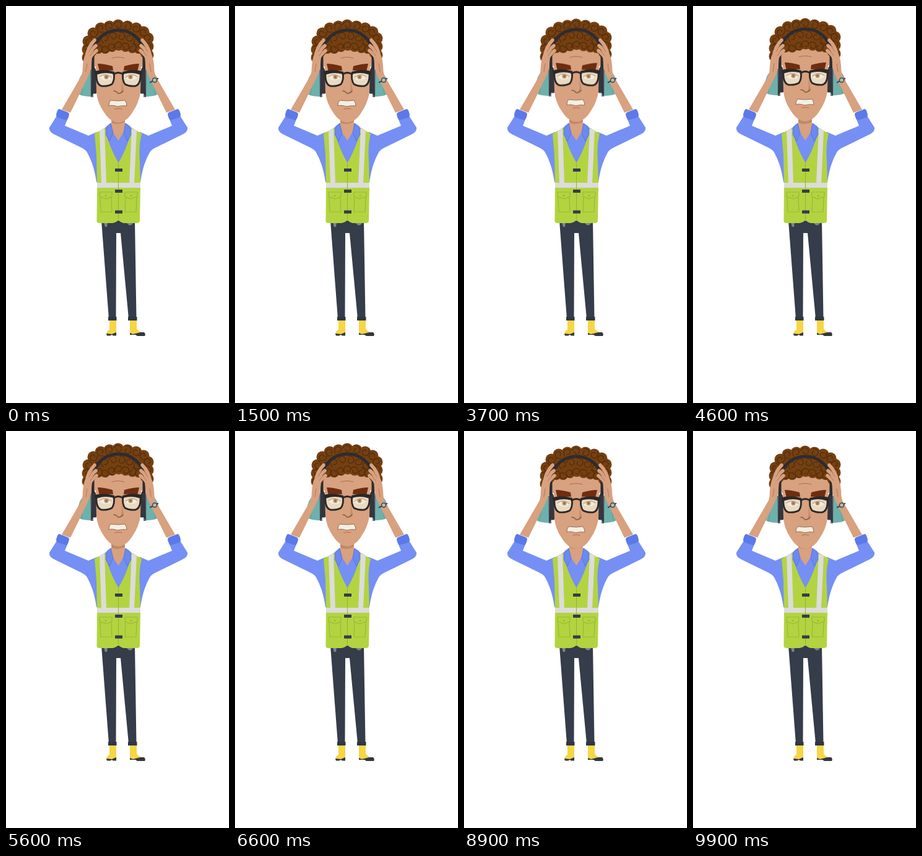
These frames come from a looping animation (360x640 px, 10 s). An HTML page:

```html
<!DOCTYPE html>
<html lang="en">
<head>
<meta charset="utf-8">
<title>Stressed worker</title>
<style>
  html, body { margin: 0; width: 100%; height: 100%; overflow: hidden; background: #fff; }
  svg { display: block; width: 100vw; height: 100vh; }
  .skin { fill: #d8a17f; }
  .shirt { fill: #758ff4; }
  .cuff { fill: #5c79e8; }
  .vest { fill: #b3d440; }
  .tape { fill: #dcdcda; }
  .dark { fill: #353c4a; }
  .line { fill: none; stroke-linecap: round; stroke-linejoin: round; }
  .head { animation: shake 500ms step-end infinite; }
  /* a sine sampled five times per cycle */
  @keyframes shake {
    0%, 100% { transform: translateY(0); }
    20% { transform: translateY(-2px); }
    40% { transform: translateY(-1.2px); }
    60% { transform: translateY(1.2px); }
    80% { transform: translateY(2px); }
  }
</style>
</head>
<body>
<svg viewBox="0 0 360 640">
  <defs>
    <g id="sleeve">
      <path class="shirt" d="M82 177L99 183L95 193L133 209L147 203L157 215V284H146Q142 255 131 236Q128 231 121 228L78 207Q69 203 70 196Z"/>
      <path class="cuff" d="M86 166Q83 166 81 175Q81 179 84 180L97 184Q100 184 102 175Q102 172 99 171Z"/>
    </g>
    <g id="hand">
      <path class="skin" d="M90 167L122 112Q124 105 124 96Q125 80 132 70L139 82Q138 91 138 98Q136 108 131 117L104 172Z"/>
      <path class="line" stroke="#d8a17f" stroke-width="5.500" d="M130 82Q132 66 143 55M132 84Q136 71 145 64M134 87Q138 78 146 72"/>
      <path class="line" stroke="#a96f50" stroke-width=".8" d="M140 64L134 74M142 72L136 80M131 93Q130 100 129 106"/>
    </g>
    <g id="muff">
      <path fill="#6db1ac" d="M138 102Q126 102 119 116Q114 130 115 139Q117 146 139 146Z"/>
      <path class="line" stroke="#5b9d9b" stroke-width="1" d="M132 107Q124 119 122 143"/>
      <path fill="#6c7278" d="M136 103L141 99V147H137Z"/>
      <path fill="#34363e" d="M138 97Q143 96 145 103L147 138Q146 143 141 141L137 147Z"/>
    </g>
    <g id="lens">
      <path id="rim" fill="#e9dac4" d="M146 108Q160 104 174 108Q176 119 171 126Q164 130 154 129Q145 126 146 108Z"/>
      <path fill="#f4ebdc" d="M151 116Q160 107 170 117Q161 123 151 116Z"/>
      <circle cx="162" cy="114.500" r="3.500" fill="#b99568"/>
      <circle cx="162" cy="114.500" r="1.300" fill="#7d6246"/>
      <path class="line" stroke="#b48f70" stroke-width="1" d="M151 114Q160 107 170 115"/>
      <use class="line" href="#rim" fill-opacity="0" stroke="#2b2827" stroke-width="2.800"/>
      <path fill="#2b2827" d="M143 105Q160 101 175 106V110Q160 106 149 110L144 111Z"/>
    </g>
    <g id="pocket" class="line" stroke="#98b936" stroke-width="1.2">
      <path d="M152 308L153 332H171L170 308M151 300H171V307L162 311L151 307Z"/>
      <circle cx="161" cy="306" r=".8"/>
    </g>
    <path id="curl" class="line" stroke="#552d0c" stroke-width="1.4" d="M-6 4Q-8 -5 0 -6Q7 -4 4 2Q1 5 -2 2"/>
  </defs>

  <!-- legs -->
  <path class="dark" d="M154 346H208L210.500 503L198 504L185 366H178L177.500 504H166Z"/>
  <path fill="#2f3644" d="M165 501H178.500V507H165ZM197 501H211.500V507H197Z"/>
  <path fill="#7d858c" d="M158 349H164L163 356H160ZM194 349H205Q203 355 198 353Z"/>
  <path fill="#f6d644" d="M167 507H178V527L171 530H162Q162 524 167 522ZM200 507H211V520Q213 524 217 525V529H200Z"/>
  <path fill="#34373d" d="M162 528L171 529L178 526V531.500H173L171 530L168 531.500H163ZM200 527L205 529L217 526H223Q226 529 224 532H212L209 530H200Z"/>

  <!-- arms and torso -->
  <use href="#sleeve"/>
  <use href="#sleeve" transform="translate(363 0) scale(-1 1)"/>
  <path class="shirt" d="M158 198L169 189H193L205 198V255H158Z"/>
  <path class="vest" d="M143 206L160 196Q164 222 181.500 253Q199 222 203 196L219 206Q214 225 216 250L217 290L216 347Q215 350 211 350H190Q185 349 181.500 345Q178 349 172 350H151Q147 350 146.500 347L147 290L146 240Z"/>
  <path class="tape" d="M151 201L159 197L162 286H154ZM203 197L211 201L207 286H199ZM147 285H217V293H147Z"/>
  <path class="line" stroke="#93b236" stroke-width="1" d="M181.500 254V345"/>
  <g class="dark">
    <rect x="176" y="262" width="12" height="5"/>
    <rect x="176" y="296" width="12" height="5"/>
    <rect x="176" y="329.500" width="12" height="5"/>
  </g>
  <use href="#pocket"/>
  <use href="#pocket" transform="translate(363 0) scale(-1 1)"/>
  <path class="skin" d="M170 178H192V192L190 203L181.500 217L172 203L170 192Z"/>
  <path fill="#c08a69" d="M170 182H192V187Q181 193 170 188Z"/>
  <path fill="#6c88f1" stroke="#5671d9" stroke-width=".8" d="M169 189L163 194L161 207L167 218L173 205ZM193 189L200 194L202 207L196 218L190 205Z"/>

  <g class="head">
    <use href="#muff"/>
    <use href="#muff" transform="translate(363 0) scale(-1 1)"/>
    <path class="skin" d="M139 66H224V98H218L217 140Q214 157 205 170Q195 187 181 188Q168 187 158 171Q148 157 146 140L145 98H139Z"/>
    <g id="hair" fill="#754011">
      <path d="M131 88L130 60L140 43L172 32H190L220 40L231 55L230 84L219 82L213 71H151L142 82Z"/>
    </g>
    <path class="line" stroke="#2c2c31" stroke-width="5" d="M140 100V75C148 27 215 27 223 75V100"/>
    <path class="line" stroke="#a86f50" stroke-width="1" d="M171 84Q181 81 191 84M176 166Q181 164 187 166"/>
    <path fill="#6e2d10" d="M148 93Q158 93 172 97L173 104Q161 103 151 106ZM215 93Q205 93 191 97L190 104Q202 103 212 106Z"/>
    <use href="#lens"/>
    <use href="#lens" transform="translate(363 0) scale(-1 1)"/>
    <path class="line" stroke="#2b2827" stroke-width="3" d="M174 110Q181 105 189 110"/>
    <path fill="#c38c6b" d="M186 116L190 135Q190 139 184 141Q188 136 186 116Z"/>
    <path class="line" stroke="#806044" stroke-width="1.500" d="M174 137Q178 137 181 141Q186 141 189 137"/>
    <path fill="#f3efe2" stroke="#987055" stroke-width="1" stroke-linejoin="round" d="M169 152Q181 154 192 152Q195 156 195 161Q188 160 180 162Q171 159 166 161Q166 155 169 152Z"/>
  </g>

  <use href="#hand"/>
  <use href="#hand" transform="translate(363 0) scale(-1 1)"/>
  <path class="line" stroke="#454b50" stroke-width="2.500" d="M233 123L245 117"/>
  <circle cx="240" cy="119.500" r="3.500" fill="#a9c0c0" stroke="#3f484c" stroke-width="1.500"/>
</svg>
<script>
  const NS = "http://www.w3.org/2000/svg";
  const hair = document.getElementById("hair");
  const add = (tag, attrs) => {
    const el = document.createElementNS(NS, tag);
    for (const key in attrs) el.setAttribute(key, attrs[key]);
    hair.append(el);
  };

  const rim = [[132, 83], [132, 70], [133, 57], [141, 44], [153, 36], [167, 33], [181, 31],
    [196, 33], [210, 36], [222, 42], [229, 52], [229, 65], [229, 79]];
  const fringe = [[149, 69], [160, 69], [171, 66], [182, 64], [193, 66], [204, 68], [214, 69]];
  const inner = [[148, 57], [160, 53], [173, 49], [186, 49], [199, 51], [212, 57]];

  for (const [cx, cy] of rim) add("circle", { cx, cy, r: 9.5 });
  for (const [cx, cy] of fringe) add("circle", { cx, cy, r: 8 });
  [...rim, ...fringe, ...inner].forEach(([x, y], i) =>
    add("use", { href: "#curl", transform: `translate(${x} ${y}) rotate(${i * 67})` }));
</script>
</body>
</html>
```
